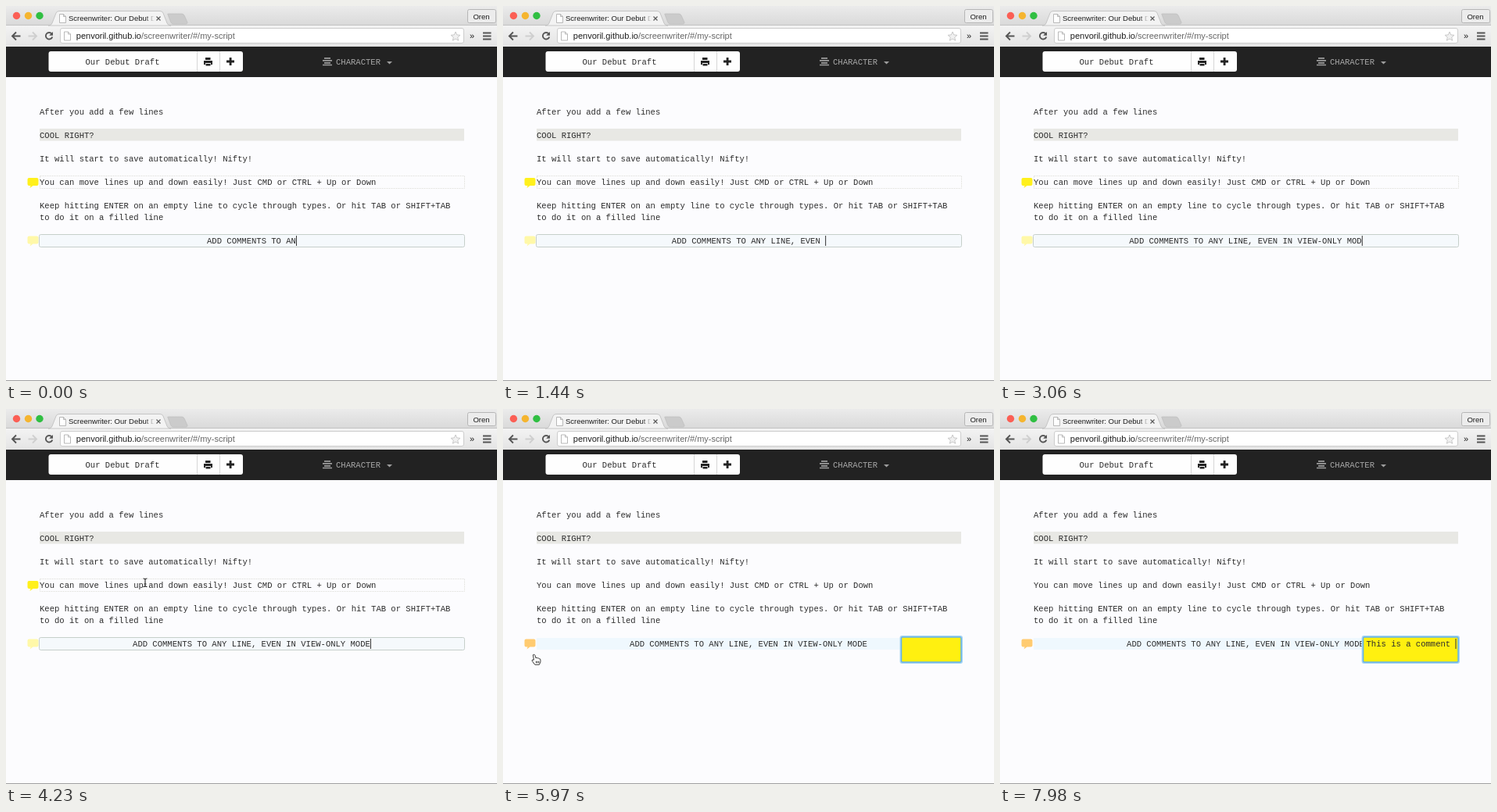
An HTML page for the animation above (8 s loop, 628x480 px).

```html
<!DOCTYPE html>
<html lang="en">
<head>
<meta charset="utf-8">
<title>Screenwriter</title>
<style>
  html, body { margin: 0; width: 100%; height: 100%; overflow: hidden; background: #fcfcfe; }
  svg { display: block; width: 628px; height: 480px; }
  text { white-space: pre; }
  .mono { font: 10.55px "Liberation Mono", monospace; fill: #2c2c2c; }
  .ui { font: 9.5px "Liberation Sans", sans-serif; fill: #1c1c1c; }
  .url { font-size: 11px; }
</style>
</head>
<body>
<svg viewBox="0 0 628 480">
  <defs>
    <linearGradient id="strip" x2="0" y2="1">
      <stop stop-color="#ebebeb"/><stop offset="1" stop-color="#d9d9d9"/>
    </linearGradient>
    <linearGradient id="toolbar" x2="0" y2="1">
      <stop stop-color="#f3f3f3"/><stop offset="1" stop-color="#e4e4e4"/>
    </linearGradient>
    <linearGradient id="fade">
      <stop stop-color="#f3f3f3" stop-opacity="0"/><stop offset="1" stop-color="#f3f3f3"/>
    </linearGradient>
    <path id="bubble" d="M2 0H12Q14 0 14 2V8Q14 10 12 10H7L3 13L4 10H2Q0 10 0 8V2Q0 0 2 0Z"/>
  </defs>
  <rect width="628" height="480" fill="#fcfcfe"/>
  <path d="M0 479.500H628" stroke="#a0a0a0"/>

  <!-- Browser window -->
  <rect width="628" height="25" fill="url(#strip)"/>
  <rect y="25" width="628" height="27" fill="url(#toolbar)"/>
  <path d="M0 24.5H628" stroke="#c2c2c2"/>
  <circle cx="13.5" cy="12.5" r="4.7" fill="#fb5f55"/>
  <circle cx="28.5" cy="12.5" r="4.7" fill="#f5b52f"/>
  <circle cx="43" cy="12.5" r="4.7" fill="#30bf42"/>
  <path d="M207 11Q206 10 208 10H225Q227 10 228 12L232 21Q232 23 230 23H214Q212 23 211 21Z" fill="#cbcbcb" stroke="#bcbcbc" stroke-width=".7"/>
  <path d="M54 25Q58 25 59 22L64 9Q65 6.500 68 6.500H197Q200 6.500 201 9L206 22Q207 25 211 25Z" fill="#f3f3f3" stroke="#bcbcbc" stroke-width=".8"/>
  <g fill="#fff" stroke="#b0b0b0" stroke-width=".9">
    <path id="page" d="M68.500 10.500H73.500L76.500 13.500V21.500H68.500ZM73.500 10.500V13.500H76.500"/>
    <rect x="590.5" y="4.500" width="36" height="17" rx="2" fill="#ececec"/>
    <rect x="69.500" y="28.500" width="516" height="19" rx="2.500" stroke="#c8c8c8"/>
    <use href="#page" x="6" y="22.500"/>
  </g>
  <text class="ui" x="80" y="19">Screenwriter: Our Debut D</text>
  <rect x="178" y="9" width="12" height="14" fill="url(#fade)"/>
  <rect x="190" y="9" width="8" height="14" fill="#f3f3f3"/>
  <path d="M192.500 13.500l5 5m0-5l-5 5" stroke="#5c5c5c" stroke-width="1.200"/>
  <text class="ui" x="608" y="16.500" text-anchor="middle">Oren</text>
  <g fill="none" stroke="#555" stroke-width="1.900">
    <path d="M18.500 38.500H8.500M13 33.500L8 38.500L13 43.500"/>
    <path d="M28.500 38.500H38.500M34 33.500L39 38.500L34 43.500" stroke="#cfcfcf"/>
    <path d="M58.500 35.500A4.300 4.300 0 1 0 59.300 39.500"/>
    <path d="M610 34.500H620.500M610 38.500H620.500M610 42.500H620.500"/>
  </g>
  <path d="M60 33V37.800H55.200Z" fill="#555"/>
  <text class="ui url" x="89.800" y="42">penvoril.github.io<tspan fill="#666">/screenwriter/#/my-script</tspan></text>
  <path d="M575 33l1.700 3.900 4.200.4-3.200 2.800 1 4.100-3.700-2.200-3.700 2.200 1-4.100-3.200-2.800 4.200-.4z" fill="#f0f0f0" stroke="#c4c4c4" stroke-width=".9"/>
  <text class="ui url" x="596" y="42" text-anchor="middle">»</text>

  <!-- Application bar -->
  <rect y="52" width="628" height="39" fill="#222"/>
  <rect x="54.500" y="58" width="248.500" height="26" rx="3" fill="#fefefe"/>
  <path d="M244.500 58V84M273.500 58V84" stroke="#d6d6d6"/>
  <text class="mono" x="149" y="75" text-anchor="middle">Our Debut Draft</text>
  <g fill="#222">
    <path d="M255 66H261.500V69H255ZM253 70H264V75H262V73H255V75H253ZM255.500 74H261.500V76.500H255.500Z"/>
    <path d="M285.700 66H288.500V69.600H292V72.400H288.500V76H285.700V72.400H282V69.600H285.700Z"/>
  </g>
  <path d="M407 66.800H415M405 69.800H417M407 72.800H415M405 75.500H417" stroke="#9d9d9d" stroke-width="1.700"/>
  <text class="mono" x="422" y="75" style="fill:#a8a8a8">CHARACTER</text>
  <path d="M487 71H494L490.500 74.500Z" fill="#9d9d9d"/>

  <!-- Script -->
  <rect x="43" y="157" width="543" height="15.500" fill="#e8e8e4"/>
  <rect id="hoverBox" x="43.500" fill="none" stroke="#e4e4e0" stroke-dasharray="2 1" width="543"/>
  <use id="hoverIcon" href="#bubble" x="27.500" fill="#fff01c"/>
  <rect id="lineFill" x="43" y="293" width="543" height="15" fill="#eff8fe"/>
  <rect id="lineFocus" x="42.500" y="292.500" width="544" height="16" rx="2" fill="#f5f9fc" stroke="#c6cfca"/>
  <use id="lineIcon" href="#bubble" x="27.500" y="294.500"/>
  <g class="mono">
    <text x="43" y="139">After you add a few lines</text>
    <text x="43" y="169">COOL RIGHT?</text>
    <text x="43" y="199">It will start to save automatically! Nifty!</text>
    <text x="43" y="229">You can move lines up and down easily! Just CMD or CTRL + Up or Down</text>
    <text x="43" y="259">Keep hitting ENTER on an empty line to cycle through types. Or hit TAB or SHIFT+TAB</text>
    <text x="43" y="274">to do it on a filled line</text>
    <text id="line" y="304"></text>
  </g>
  <g id="note">
    <rect id="noteGlow" y="290" height="36" rx="3" fill="#a9d6f3"/>
    <rect id="noteBox" y="292" height="32" rx="1.500" fill="#fff010" stroke="#66b2e6" stroke-width="1.500"/>
    <text id="noteText" class="mono" y="304"></text>
  </g>
  <rect id="caret" width="1" height="13" y="294" fill="#333"/>

  <!-- Pointers, drawn around their hotspots -->
  <path id="beam" d="M-2.500 -5Q0 -5 0 -3.500V4Q0 5.500 -2.500 5.500M2.500 -5Q0 -5 0 -3.500M0 4Q0 5.500 2.500 5.500M-1.500 2H1.500" fill="none" stroke="#222" stroke-width="1.100"/>
  <path id="hand" d="M-1.500 0Q0 -1.500 1 .5L2 4Q3.500 2.800 4.300 4.200Q5.800 3.500 6.300 5Q8 4.600 8 6.500V9L6.500 12.500H.8L-2.800 7.500Q-3 5.500 -.5 6.500ZM2.500 8V10.500M4.200 8V10.500M5.900 8V10.500" fill="#fff" stroke="#222" stroke-width=".9"/>
</svg>
<script>
const LOOP = 8000, CHAR = 6.331, KEY_MS = 104;
const SCRIPT_LINE = "ADD COMMENTS TO ANY LINE, EVEN IN VIEW-ONLY MODE";
const NOTE = "This is a comment ";
const SCRIPT_DONE = 3120, POINTER_ON = 4080, BLUR = 5150, NOTE_OPEN = 5360, NOTE_TYPE = 6100;
const HOVER_ROWS = [[217.5, 17], [247.5, 32]];

const el = id => document.getElementById(id);
const show = (id, on) => el(id).setAttribute("display", on ? "inline" : "none");
const set = (id, attrs) => { for (const k in attrs) el(id).setAttribute(k, attrs[k]); };
const clamp = (v, lo, hi) => Math.min(hi, Math.max(lo, v));
const ease = (t, from, to) => { const p = clamp((t - from) / (to - from), 0, 1); return p * p * (3 - 2 * p); };
const blink = idle => idle < 500 || Math.floor(idle / 500) % 2 === 0;

function drawPointer(t) {
  const go = ease(t, 4250, 4850), drift = ease(t, 5650, 6000);
  const x = 178 - 142 * go + 4 * drift;
  const y = 222 + 79 * go + 14 * drift;
  const visible = t >= POINTER_ON && t < NOTE_TYPE;
  const overIcon = x < 42;
  show("beam", visible && !overIcon);
  show("hand", visible && overIcon);
  set(overIcon ? "hand" : "beam", { transform: `translate(${x} ${y})` });

  const row = HOVER_ROWS.find(([top, h]) => y >= top && y <= top + h);
  show("hoverBox", row);
  show("hoverIcon", row);
  if (row) {
    set("hoverBox", { y: row[0], height: row[1] - 1 });
    set("hoverIcon", { y: row[0] + 2.5 });
  }
  return y >= 292;
}

function drawLine(t, hovered) {
  const count = clamp(Math.floor(18 + t / KEY_MS), 18, SCRIPT_LINE.length);
  const left = 314 - count * CHAR / 2;
  el("line").textContent = SCRIPT_LINE.slice(0, count);
  set("line", { x: left });
  show("lineFocus", t < BLUR);
  show("lineFill", t >= BLUR);
  set("lineIcon", { fill: t >= NOTE_OPEN ? "#ffcb70" : hovered ? "#ffee10" : "#fff8a8" });
  return left + count * CHAR;
}

function drawNote(t) {
  const count = clamp(Math.floor((t - NOTE_TYPE) / KEY_MS), 0, NOTE.length);
  const width = Math.max(79, count * CHAR + 10);
  const left = 587.5 - width;
  el("noteText").textContent = NOTE.slice(0, count);
  set("noteGlow", { x: left - 1, width: width + 1.5 });
  set("noteBox", { x: left + 1, width: width - 2.5 });
  set("noteText", { x: left + 5 });
  return left + 5 + count * CHAR;
}

function draw(t) {
  const lineEnd = drawLine(t, drawPointer(t));
  const noteEnd = drawNote(t);
  const noteOpen = t >= NOTE_OPEN;
  show("note", noteOpen);
  set("caret", { x: noteOpen ? noteEnd : lineEnd });
  const idle = t < SCRIPT_DONE || t >= NOTE_TYPE ? 0 : t - (noteOpen ? NOTE_OPEN : SCRIPT_DONE);
  show("caret", (t < BLUR || noteOpen) && blink(idle));
}

function frame() {
  draw(performance.now() % LOOP);
  requestAnimationFrame(frame);
}
frame();
</script>
</body>
</html>
```
